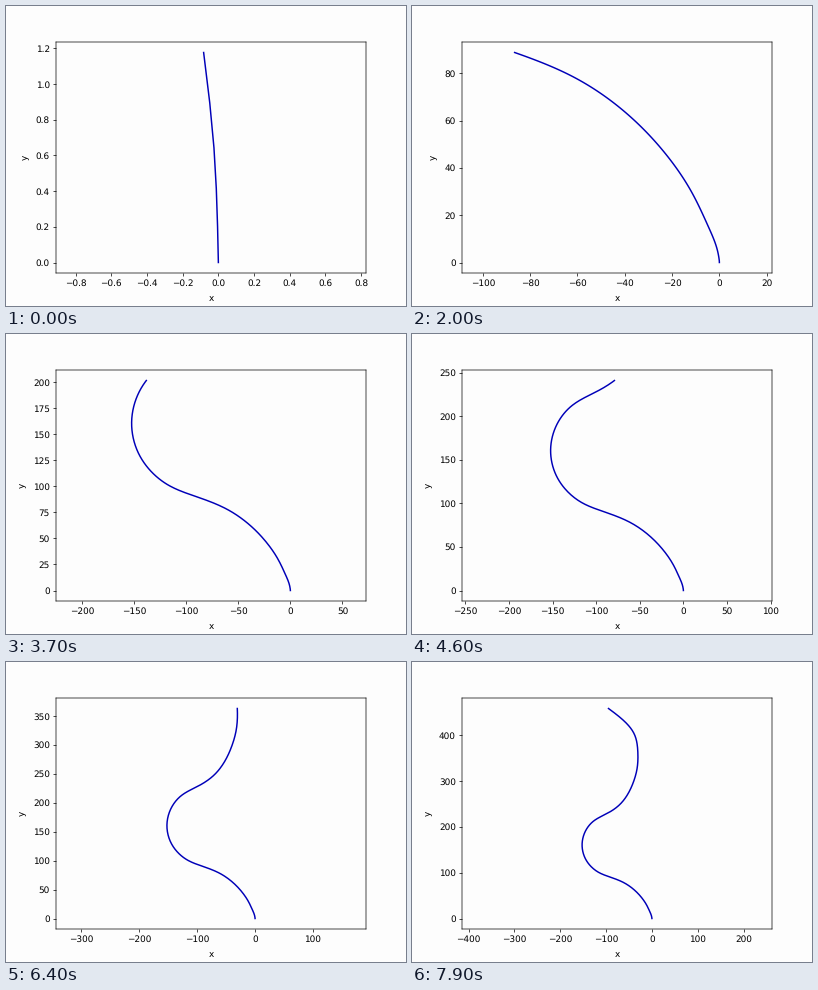
A matplotlib script that plays this animation: 400x300 px, repeating every 8000 ms.

```python
import numpy as np
import matplotlib.pyplot as plt
from matplotlib.animation import FuncAnimation

FRAMES, INTERVAL, STEPS = 80, 100, 5
PAPER, INK = "#fdfdfd", "#0000b8"

# Bends of the winding path
BENDS = np.array([
    (0, 0), (-.026, .66), (-.083, 1.18), (-1, 5.8), (-4.5, 14.8),
    (-11.8, 29.9), (-22.4, 45.5), (-35.1, 59.3), (-60.7, 77.9),
    (-90.4, 90.1), (-117.9, 101.6), (-133, 113.6), (-145.5, 131.2),
    (-152.3, 161.2), (-143.5, 193.5), (-128.3, 211.7), (-96.9, 229.6),
    (-69.6, 249.1), (-54.6, 268), (-40.2, 298), (-32.4, 326.7),
    (-30.7, 362.9), (-38.1, 401.5), (-63.1, 433.1), (-94.7, 458.1)])

# Distance travelled at a few times: a standing start, then a cruise
TIMES = np.array([-1, 0, 5, 12, 28, 37, 54, 64, 79], float)
TRAVEL = np.array([0, 1.18, 20, 69.9, 194.4, 278.1, 407.4, 485.4, 605.3])


def spline(xs, ys):
    """Natural cubic spline through the points (xs, ys)."""
    h = np.diff(xs)
    bend = np.zeros(len(xs))
    system = (np.diag(2 * (h[:-1] + h[1:]))
              + np.diag(h[1:-1], 1) + np.diag(h[1:-1], -1))
    bend[1:-1] = np.linalg.solve(system, 6 * np.diff(np.diff(ys) / h))

    def curve(x):
        i = np.clip(np.searchsorted(xs, x, side="right") - 1, 0, len(h) - 1)
        a, b, w = xs[i + 1] - x, x - xs[i], h[i]
        return ((bend[i] * a**3 + bend[i + 1] * b**3) / (6 * w)
                + (ys[i] / w - bend[i] * w / 6) * a
                + (ys[i + 1] / w - bend[i + 1] * w / 6) * b)

    return curve


chords = np.hypot(*np.diff(BENDS, axis=0).T)
along = np.concatenate(([0], np.cumsum(chords)))
clock = np.arange(-STEPS, (FRAMES - 1) * STEPS + 1) / STEPS
dist = spline(TIMES, TRAVEL)(clock)
trail_x, trail_y = (spline(along, c)(dist) for c in BENDS.T)

plt.rcParams.update({"font.size": 10.2, "text.hinting": "none",
                     "path.snap": False, "axes.labelpad": 7.5})
fig, ax = plt.subplots(figsize=(6.4, 4.8), dpi=62.5, facecolor=PAPER)
ax.set_facecolor(PAPER)
ax.set_xlabel("x")
ax.set_ylabel("y")
line, = ax.plot([], [], color=INK, lw=1.7)
box = ax.get_position()
ratio = box.width * 6.4 / (box.height * 4.8)


def update(frame):
    n = STEPS * (frame + 1) + 1
    x, y = trail_x[:n], trail_y[:n]
    line.set_data(x, y)
    # Equal scale on both axes, fitted to the height
    top = y.max()
    mid, half = (x.min() + x.max()) / 2, 0.55 * top * ratio
    ax.set_xlim(mid - half, mid + half)
    ax.set_ylim(-0.05 * top, 1.05 * top)
    return line,


anim = FuncAnimation(fig, update, frames=FRAMES, interval=INTERVAL,
                     repeat=True, repeat_delay=0, blit=False)
plt.show()
```
